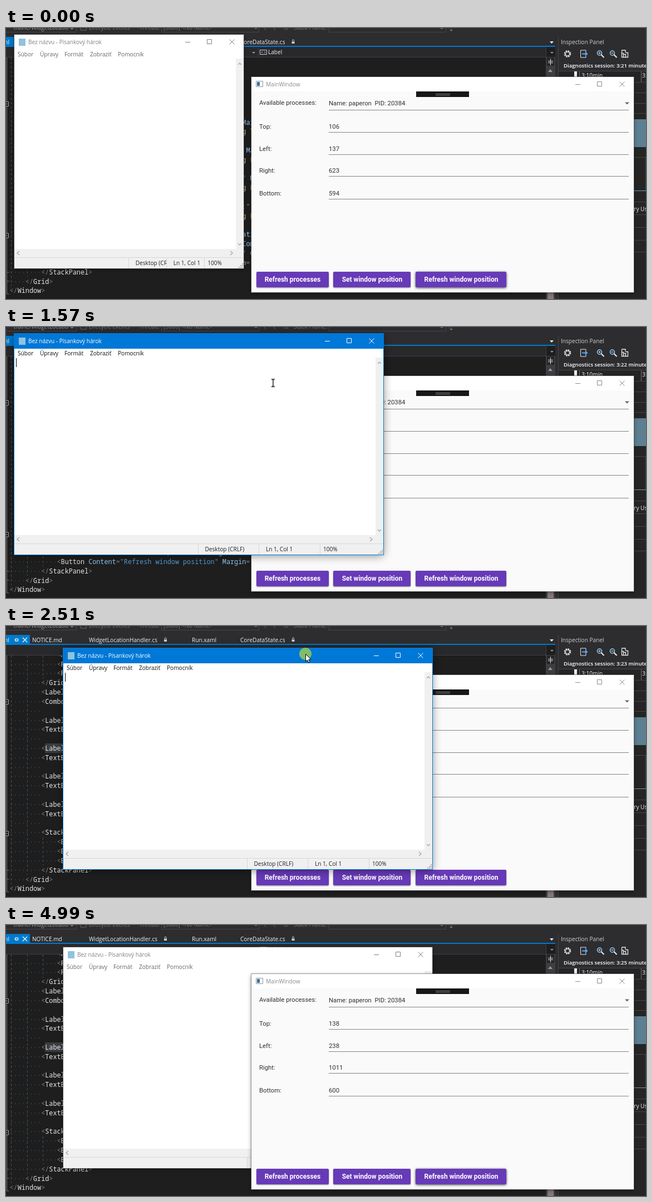
An HTML page that plays this animation: 1150 by 487 pixels, repeating every 5080 ms.

```html
<!DOCTYPE html>
<html lang="en">
<head>
<meta charset="utf-8">
<title>Window position demo</title>
<style>
html, body { margin: 0; width: 100%; height: 100%; overflow: hidden; background: #1e1e1e; }
#stage { position: relative; width: 1150px; height: 487px; overflow: hidden; font: 10.1px "Open Sans", "Noto Sans", sans-serif; }
#stage * { box-sizing: border-box; }
#stage > *, .note > * { position: absolute; }
svg { display: block; overflow: hidden; }
text { white-space: pre; }
.anim, .note, .main, .cursor, .cursor g, .cursor circle { animation: 5.08s step-end infinite; }

/* editor */
.code { font: 11.8px "Noto Sans Mono", "DejaVu Sans Mono", monospace; fill: #808080; }
.code .e { fill: #e6e6e6; }
.code .a { fill: #92caf4; }
.code .s { fill: #569cd6; }
.code .b { fill: #d7ba7d; }
.code .d { fill: #2a5570; }
.light { fill: #f1f1f1; }
.session { left: 1002px; top: 58px; width: 160px; height: 20px; line-height: 20px; overflow: hidden;
  white-space: pre; color: #fff; font-weight: 600; font-size: 9.6px; }
.session b { display: inline-block; vertical-align: top; font-weight: inherit; animation-name: seconds; }
@keyframes seconds {
  0% { transform: none; } 23.6% { transform: translateY(-20px); } 41.3% { transform: translateY(-40px); }
  67% { transform: translateY(-60px); } 78.7%, 100% { transform: translateY(-80px); }
}

/* windows */
.note, .main {
  background: #fff; outline: 1px solid var(--edge);
  box-shadow: 0 2px var(--blur) rgba(0, 0, 0, .45);
}
.bar { fill: var(--bar); background: var(--bar); }
.cap { fill: var(--cap); color: var(--cap); }
.ctl { fill: none; stroke: var(--cap); }
.main { left: 441px; top: 88px; width: 687px; height: 387px; z-index: 2; animation-name: mainState; }
@keyframes mainState {
  0%, 98.2%, 100% { --bar: #fff; --cap: #8a8a8a; --edge: rgba(100, 100, 100, .6); --blur: 7px; }
  59.8% { --bar: #0078d7; --cap: #fff; --edge: #0078d7; --blur: 15px; }
}
.note {
  left: 15px; top: 12px; width: 412px; height: 420px;
  animation: noteState 5.08s step-end infinite, size 5.08s linear infinite, drag 5.08s linear infinite;
}
@keyframes noteState {
  0% { --bar: #fff; --cap: #808080; --menu: #666; --edge: rgba(100, 100, 100, .6); --blur: 7px; z-index: 3; }
  17.3% { --bar: #0078d7; --cap: #fff; --menu: #111; --edge: #0078d7; --blur: 15px; z-index: 3; }
  59.8%, 100% { --bar: #fff; --cap: #808080; --menu: #666; --edge: rgba(100, 100, 100, .6); --blur: 7px; z-index: 1; }
}
@keyframes size {
  0%, 19.3% { width: 412px; height: 420px; animation-timing-function: ease-in-out; }
  27.3%, 100% { width: 663px; height: 397px; }
}
@keyframes drag {
  0%, 39.8% { left: 15px; top: 12px; animation-timing-function: ease-in; }
  44.4%, 44.6% { left: 62px; top: 25px; animation-timing-function: ease-out; }
  49.3%, 100% { left: 103px; top: 40px; }
}
.note .bar { left: 0; right: 0; top: 0; height: 27px; line-height: 27px; padding-left: 25px; }
.note .icon { left: 8px; top: 7px; width: 12px; height: 13px; background: #8fc3de; }
.note .ctl { right: 0; top: 0; }
.menu { top: 25px; line-height: 20px; color: var(--menu); }
.vbar, .hbar, .status { background: #f0f0f0; }
.vbar { right: 0; top: 43px; bottom: 35px; width: 14px; }
.hbar { left: 0; right: 0; bottom: 20px; height: 15px; }
.status { left: 0; right: 0; bottom: 0; height: 20px; border-top: 1px solid #d7d7d7; line-height: 19px; color: #222; }
.status span { position: absolute; top: 0; height: 19px; overflow: hidden; white-space: nowrap; border-left: 1px solid #d7d7d7; padding-left: 12px; }
.arrow-s { fill: none; stroke: #a8a8a8; stroke-width: 1.4; }
.note svg.arrow-s { position: absolute; }
.caret { left: 3px; top: 44px; width: 1px; height: 16px; background: #000; animation-name: caret; }
@keyframes caret {
  0%, 33.5%, 55.1%, 100% { opacity: 0; } 17.3%, 45.3% { opacity: 1; }
}

/* form */
.form { font: 11.3px Roboto, "Open Sans", sans-serif; fill: #303030; }
.btn text { font: 600 12px Roboto, "Open Sans", sans-serif; fill: #fff; text-anchor: middle; }
.btn > rect { fill: #673ab7; filter: drop-shadow(0 1px 1px rgba(0, 0, 0, .45)); }
.btn > rect.anim { animation: lift 5.08s linear infinite; }
@keyframes lift {
  0%, 2%, 72.5%, 100% { filter: drop-shadow(0 1.5px 2px rgba(0, 0, 0, .75)); }
  6%, 70.5% { filter: drop-shadow(0 1px 1px rgba(0, 0, 0, .45)); }
}
.ripple { fill: #fff; animation: ripple 5.08s linear infinite; }
@keyframes ripple {
  0%, 79.7% { r: 0; opacity: .27; } 83.2% { r: 68px; opacity: .27; }
  85% { r: 92px; opacity: .22; } 89%, 100% { r: 92px; opacity: 0; }
}
.before { animation-name: before; }
.after { animation-name: after; }
@keyframes before { 0% { opacity: 1; } 80.9%, 100% { opacity: 0; } }
@keyframes after { 0% { opacity: 0; } 80.9%, 100% { opacity: 1; } }

/* pointer */
.cursor { left: 0; top: 0; width: 40px; height: 40px; margin: -20px; z-index: 9; animation: path 5.08s linear infinite; }
@keyframes path {
  0%, .98% { transform: translate(800px, 418px); animation-timing-function: ease-in-out; }
  11% { transform: translate(417px, 418px); }
  12.4% { transform: translate(421px, 426px); }
  13.4%, 17% { transform: translate(422px, 426px); }
  17.3%, 19.3% { transform: translate(427px, 426px); animation-timing-function: ease-in-out; }
  27.3%, 28.3% { transform: translate(676px, 400px); animation-timing-function: ease-out; }
  30.9% { transform: translate(480px, 101px); animation-timing-function: ease-out; }
  38.4%, 39.8% { transform: translate(450px, 22px); animation-timing-function: ease-in; }
  44.4%, 44.6% { transform: translate(497px, 35px); animation-timing-function: ease-out; }
  49.3%, 50.7% { transform: translate(538px, 50px); animation-timing-function: ease-in-out; }
  59.8%, 62.2% { transform: translate(825px, 386px); animation-timing-function: ease-in-out; }
  72% { transform: translate(824px, 447px); animation-timing-function: ease-out; }
  77%, 84.6% { transform: translate(824px, 458px); animation-timing-function: ease-in; }
  91.1%, 100% { transform: translate(838px, 512px); }
}
.cursor .halo { fill: rgba(255, 255, 0, .5); animation-name: halo; }
.cursor .point { animation-name: point; }
.cursor .grow { animation-name: grow; }
.cursor .beam { animation-name: beam; }
.cursor .hand { animation-name: hand; }
@keyframes halo {
  0%, 27.6%, 49.5%, 62.2%, 80.9%, 100% { opacity: 0; } 17.3%, 39%, 59.8%, 78.9% { opacity: 1; }
}
@keyframes point { 0%, 12.4%, 70.9%, 100% { opacity: 0; } .98%, 33.5% { opacity: 1; } }
@keyframes grow { 0%, 28.3%, 100% { opacity: 0; } 12.4% { opacity: 1; } }
@keyframes beam { 0%, 33.5%, 100% { opacity: 0; } 28.3% { opacity: 1; } }
@keyframes hand { 0%, 91.2%, 100% { opacity: 0; } 70.9% { opacity: 1; } }
</style>
</head>
<body>
<div id="stage">
  <svg width="1150" height="487">
    <defs>
      <g id="lock" fill="#d0d0d0"><path d="M-1.5 0v-2a1.5 1.5 0 0 1 3 0v2" fill="none" stroke="#d0d0d0"/><path d="M-2.5 0h5v3.5h-5z"/></g>
      <g id="fold"><path d="M-4 -4h8v8h-8z" fill="#1e1e1e" stroke="#a5a5a5"/><path d="M-2 0h4" stroke="#ccc"/></g>
      <g id="lens" fill="none" stroke="#9fcdf0" stroke-width="1.5"><circle r="4"/><path d="M3 3l5 5" stroke="#f1f1f1" stroke-width="2"/><path d="M-2 0h4"/></g>
      <path id="controls" d="M16 13.500h9M55.500 8.500h8v8h-8zM95.500 8.500l9 9m0 -9l-9 9"/>
    </defs>
    <path d="M70 211h36v17h-36z" fill="#3a3d41"/>
    <g stroke="#4c5156" stroke-dasharray="4 4"><path d="M9.500 53v411M38.500 53v394M66.500 53v42M66.500 380v50"/></g>
    <path d="M1.500 53v425M1.500 439h4M1.500 455h4M1.500 478h4" stroke="#777" fill="none"/>
    <use href="#fold" x=".5" y="136.500"/><use href="#fold" x=".5" y="373"/>
    <g class="code" id="code"></g>

    <path d="M0 0h1150v33h-1150z" fill="#2d2d30"/>
    <g fill="#747474">
      <text x="112" y="3" text-anchor="end" fill="#999">trainerWidgetLocatio</text>
      <text x="149" y="3">Lifecycle Events</text>
      <text x="240" y="3">Thread:</text><text x="283" y="3">[3080] &lt;No Name&gt;</text>
      <text x="517" y="3">Stack Frame:</text>
      <path d="M115 0h7l-3.500 3zM446 0h6l-3 2zM780 0h6l-3 2zM797 3h6l-3 3z"/>
      <path d="M134 -2h10v6h-10zM464 0l3 4M481 0l3 4M499 2h8" fill="none" stroke="#666"/>
    </g>
    <path d="M0 7.500h126.500v-8M279.500 0v7.500h175v-8M580.500 0v7.500h210v-8M796 1h7" stroke="#46464a" fill="none"/>
    <path d="M0 34h970v19h-970z" fill="#29292c"/>
    <path d="M0 16h43v16h-43zM0 32h987v2h-987z" fill="#007acc"/>
    <g class="light">
      <text x="-6" y="28.600">ml</text>
      <text x="47" y="28.600">NOTICE.md</text>
      <text x="149" y="28.600">WidgetLocationHandler.cs</text>
      <text x="334" y="28.600">Run.xaml</text>
      <text x="421" y="28.600">CoreDataState.cs</text>
      <path d="M977 24h7l-3.500 4z"/>
    </g>
    <use href="#lock" x="286.500" y="24.500"/><use href="#lock" x="516" y="24.500"/>
    <path d="M15 25h2.500m0 -3v6m0 -5h4v4h-4M30 21l8 8m0 -8l-8 8" fill="none" stroke="#fff" stroke-width="1.200"/>
    <path d="M0 52.500h987" stroke="#3f3f46"/>
    <path d="M453.500 36v16M970.500 35v18" stroke="#3f3f46"/>
    <path d="M456.500 39.500h12v8h-12z M461 41.500l-2 2 2 2m3 -4l2 2 -2 2" fill="none" stroke="#ccc"/>
    <text class="light" x="471" y="47">Label</text>
    <path d="M442 43h6l-3 3zM978 43h6l-3 3z" fill="#999"/>
    <path d="M970 53h17v434h-17z" fill="#3e3e42"/>
    <path d="M972 53h13v15h-13z" fill="#252526"/>
    <path d="M974 59.500h9m-9 3h9M978.500 55v12" stroke="#ddd"/>
    <path d="M974 79h8l-4 -5z" fill="#999"/>
    <path d="M973 475h11v12h-11z" fill="#85797d"/>

    <path d="M987 15h163v472h-163z" fill="#2d2d30"/>
    <path d="M992.500 16v471" stroke="#46464a"/>
    <path d="M993 77h157v410h-157z" fill="#252526"/>
    <text x="997" y="29.200" fill="#d0d0d0">Inspection Panel</text>
    <g fill="none" stroke="#e6e6e6">
      <circle cx="1009" cy="46.500" r="5" stroke-width="2.500" stroke-dasharray="2.600 1.300"/><circle cx="1009" cy="46.500" r="3.500"/>
      <path d="M1042 43v-3h-9.500v13h9.500v-3"/><path d="M1035 46.500h9m-3 -3l3 3 -3 3" stroke="#55aaff" stroke-width="2"/>
      <path d="M1106.500 41v11.500h3v-7h-3m3 2h4v5h-4m4 -8h4v8h-4M1106 40h7v4" stroke-width="1.300"/>
    </g>
    <use href="#lens" x="1066.500" y="45"/><path d="M1066.500 43v4" stroke="#9fcdf0"/>
    <use href="#lens" x="1089.500" y="45"/>
    <path d="M993 77.500h157M993 97.500h157" stroke="#46464a"/>
    <path d="M1021 78h5v11h-5z" fill="#eee"/><path d="M1030.500 78v19M1141.500 78v19" stroke="#777"/>
    <text class="light" x="1034" y="89">3:10min</text><text class="light" x="1143" y="89">3:20min</text>
    <path d="M1120 116.500h30M1120 135.500h30M1120 153.500h30M1120 232.500h30M1120 312.500h30M1120 335.500h30M1120 358.500h30M1120 381.500h30M1120 402.500h30" stroke="#46464a"/>
    <path d="M1120 164h30v50h-30z" fill="#5c7f92"/><path d="M1149.500 232v60" stroke="#46464a"/>
    <path d="M1120 292.500h30" stroke="#6f9fb8"/>
    <text class="light" x="1098" y="328.600">Memory Usage</text>
  </svg>
  <div class="session">Diagnostics session: 3:2<b class="anim">1<br>2<br>3<br>4<br>5</b> minutes</div>

  <div class="main">
    <svg width="687" height="387" viewBox="441 88 687 387">
      <path d="M441 88h687v387h-687z" fill="#fafafa"/>
      <path class="bar" d="M441 88h687v26h-687z"/>
      <path d="M449.500 95.500h12v10h-12z" fill="#fff" stroke="#8a97a3"/><path d="M451 97h5v7h-5z" fill="#42708f"/>
      <text class="cap" x="467" y="104.800">MainWindow</text>
      <use class="ctl" href="#controls" x="1007" y="88"/>
      <path d="M737 114h95v10h-95z" fill="#171717"/><path d="M772 118.500h26m-26 2.500h26" stroke="#777"/>
      <g class="form" id="form">
        <text x="455" y="138.400">Available processes:</text>
        <text x="580" y="139.400">Name: paperon  PID: 20384</text>
        <path d="M1112 133.500h8l-4 4z" fill="#666"/>
        <path d="M580 147.500h539" stroke="#858585"/>
      </g>
      <clipPath id="face"><rect x="736" y="438" width="163" height="28" rx="2"/></clipPath>
      <g class="btn"><rect x="450" y="438" width="130" height="28" rx="2"/><text x="515" y="456.400">Refresh processes</text></g>
      <g class="btn"><rect x="588" y="438" width="139" height="28" rx="2"/><text x="658" y="456.400">Set window position</text></g>
      <g class="btn"><rect class="anim" x="736" y="438" width="163" height="28" rx="2"/><text x="818" y="456.400">Refresh window position</text>
        <g clip-path="url(#face)"><circle class="ripple" cx="824" cy="459" r="0"/></g></g>
    </svg>
  </div>

  <div class="note">
    <div class="bar cap">Bez názvu - Písankový hárok</div>
    <div class="icon"></div>
    <svg class="ctl" width="121" height="27"><use href="#controls"/></svg>
    <span class="menu" style="left:6px">Súbor</span>
    <span class="menu" style="left:46px">Úpravy</span>
    <span class="menu" style="left:90px">Formát</span>
    <span class="menu" style="left:136px">Zobraziť</span>
    <span class="menu" style="left:186px">Pomocník</span>
    <div class="vbar">
      <svg class="arrow-s" style="top:4px" width="14" height="10"><path d="M4 7l3 -3 3 3"/></svg>
      <svg class="arrow-s" style="bottom:3px" width="14" height="10"><path d="M4 3l3 3 3 -3"/></svg>
    </div>
    <div class="hbar">
      <svg class="arrow-s" style="left:2px;top:2px" width="10" height="12"><path d="M7 2l-4 3.500 4 3.500"/></svg>
      <svg class="arrow-s" style="right:17px;top:2px" width="10" height="12"><path d="M3 2l4 3.500 -4 3.500"/></svg>
    </div>
    <div class="status">
      <span style="left:49.700%;width:16.500%">Desktop (CRLF)</span>
      <span style="left:66.200%;width:16.600%">Ln 1, Col 1</span>
      <span style="left:82.800%;padding-left:5px">100%</span>
      <svg style="position:absolute;right:0;bottom:0" width="10" height="10" fill="#aaa"><path d="M7 1h2v2h-2zM4 4h2v2h-2zM7 4h2v2h-2zM1 7h2v2h-2zM4 7h2v2h-2zM7 7h2v2h-2z"/></svg>
    </div>
    <div class="caret anim"></div>
  </div>

  <svg class="cursor" viewBox="-20 -20 40 40" stroke="#000" fill="#fff">
    <circle class="halo" r="11" stroke="none"/>
    <g class="point"><path d="M.5 .5v13.500l3 -3 2.200 5 2.200 -1 -2.200 -4.800h4.300z"/></g>
    <g class="grow"><path d="M-6.500 -6.500h6l-2 2 7 7 2 -2v6h-6l2 -2 -7 -7 -2 2z"/></g>
    <g class="beam"><path d="M-3 -6.500h2.500l.5 .5 .5 -.5h2.500M0 -6v12M-3 6.500h2.500l.5 -.5 .5 .5h2.500" fill="none" stroke-width="1.300"/></g>
    <g class="hand"><path d="M-1.500 10v-9q1.500 -2 3 0v5q1.500 -1 2.500 .5 1.500 -1 2.500 .7 1.700 -.5 2 1.300v4.500l-1.500 5h-7l-4.500 -7q.5 -2 3 -1z"/></g>
  </svg>
</div>
<script>
const NS = "http://www.w3.org/2000/svg";
const fields = [["Top", 106, 138, 177], ["Left", 137, 238, 217], ["Right", 623, 1011, 256], ["Bottom", 594, 600, 297]];

function addText(parent, x, y, html, cls) {
  const el = document.createElementNS(NS, "text");
  el.setAttribute("x", x);
  el.setAttribute("y", y);
  if (cls) el.setAttribute("class", cls);
  el.innerHTML = html;
  parent.append(el);
}

const form = document.getElementById("form");
fields.forEach(([name, from, to, y]) => {
  addText(form, 455, y + 3.8, name + ":");
  addText(form, 580, y + 3.8, from, "anim before");
  addText(form, 580, y + 3.8, to, "anim after");
  const line = document.createElementNS(NS, "path");
  line.setAttribute("d", `M580 ${y + 10.5}h539`);
  line.setAttribute("stroke", "#858585");
  form.append(line);
});

// each row: [indent, markup]
const rows = Array(3).fill([12, '<RowDefinition Height="Auto"/>']);
rows.push([8, "</Grid.RowDefinitions>"], [8, '<Label Content="Available processes:"/>'],
  [8, '<ComboBox ItemsSource="{Binding Items}"/>'], null);
fields.forEach(([name], i) => {
  const at = n => `Grid.Row="${i + 1}" Grid.Column="${n}"`;
  rows.push([8, `<Label ${at(0)} Content="${name}:" Margin="5"/>`], [8, `<TextBox ${at(1)} Text="{Binding ${name}}"/>`], null);
});
rows.push([8, '<StackPanel Grid.Row="6" Grid.ColumnSpan="2" Orientation="Horizontal">']);
["Refresh processes", "Set window position", "Refresh window position"].forEach(s =>
  rows.push([12, `<Button Content="${s}" Margin="5" Command="{Binding Run}"/>`]));
rows.push([8, "</StackPanel>"], [4, "</Grid>"], [0, "</Window>"]);

const esc = s => s.replace(/</g, "&lt;").replace(/>/g, "&gt;");
const paint = s => s.replace(/"[^"]*"|<\/?|\/?>|[\w.]+/g, (t, i) => {
  const cls = t[0] === '"' ? (t[1] === "{" ? "b" : "s") : /\w/.test(t) ? (/[<\/]/.test(s[i - 1] || "") ? "e" : "a") : "";
  return cls ? `<tspan class="${cls}">${esc(t)}</tspan>` : esc(t);
});

const code = document.getElementById("code");
rows.forEach((row, n) => {
  const [indent, s] = row || [8, ""];
  addText(code, 6.5, 55.7 + 16.83 * n, `<tspan class="d">${"·".repeat(indent)}</tspan>${paint(s)}`);
});
</script>
</body>
</html>
```
